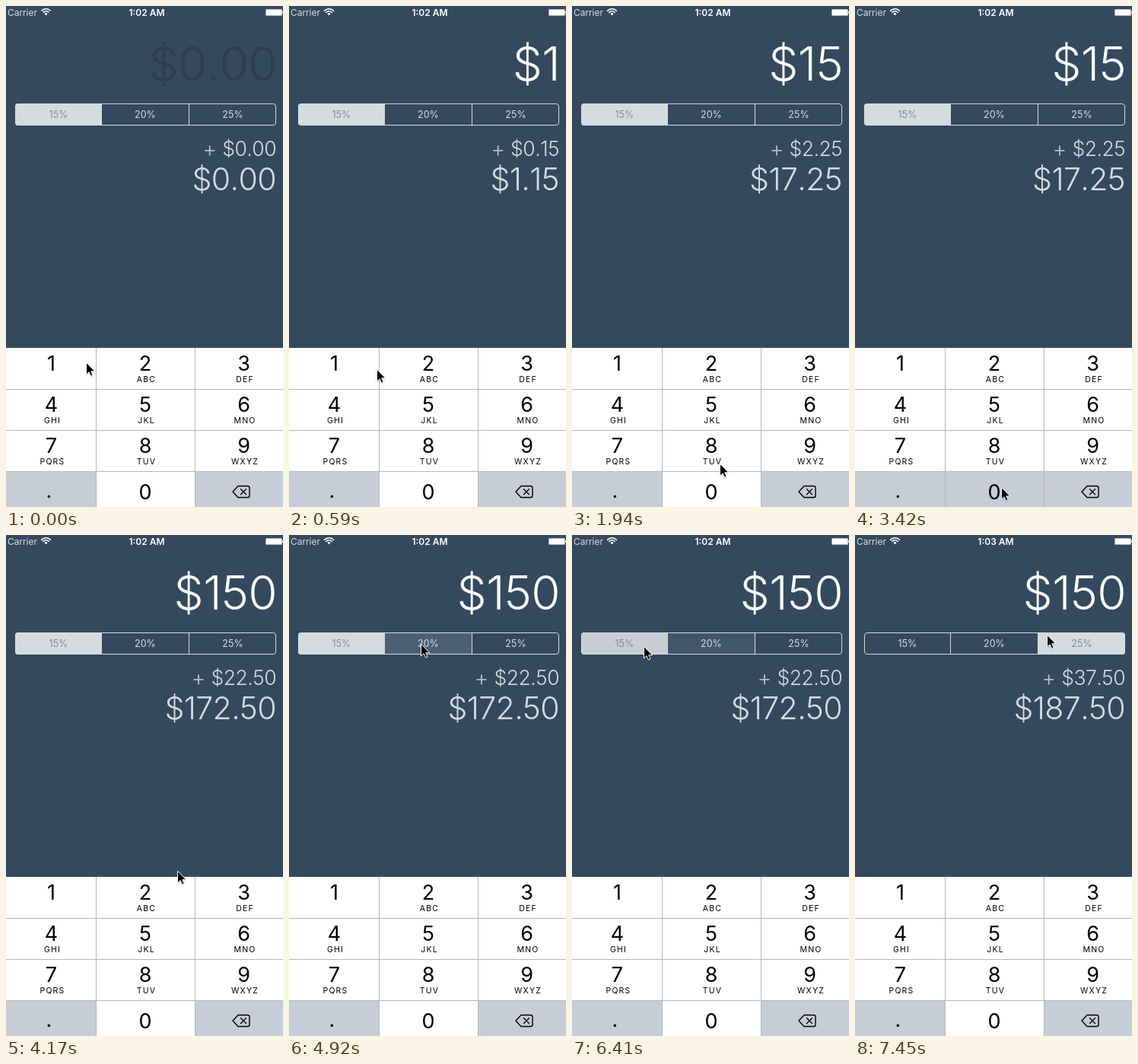
These frames come from a looping animation (364x658 px, 8 s). An HTML page with a canvas:

```html
<!DOCTYPE html>
<html lang="en">
<head>
<meta charset="utf-8">
<title>Tip calculator</title>
<style>
html, body { margin: 0; width: 364px; height: 658px; overflow: hidden; background: #34495e; }
canvas { display: block; width: 364px; height: 658px; }
</style>
</head>
<body>
<canvas id="stage"></canvas>
<script>
const W = 364, H = 658, LOOP = 8000, TICK = 149;
const BG = '#34495e', PALE = '#d6dbdf', GREY = '#c6cdd7', LINE = '#b4b6ba';
const canvas = document.getElementById('stage');
const ctx = canvas.getContext('2d');
const dpr = window.devicePixelRatio || 1;
canvas.width = W * dpr;
canvas.height = H * dpr;
ctx.scale(dpr, dpr);
ctx.fontKerning = 'none';

const typed = [[0, 0], [2, 1], [10, 15], [24, 150]];
const picked = [[0, 0], [34, 1], [43, 0], [49, 2]];
const keyTaps = [[1, '1'], [9, '5'], [23, '0']];
const segTaps = [[33, 1], [42, 0], [48, 2]];
const percents = [15, 20, 25];

const easeOut = u => 1 - Math.pow(1 - u, 2.15);
const easeBoth = u => u * u * (3 - 2 * u);
const moves = [
  { at: 4, n: 4, ease: easeBoth, to: [167, 528], via: [136, 498] },
  { at: 11, n: 7, ease: easeOut, to: [192, 632], via: [202, 580] },
  { at: 26, n: 7, ease: easeBoth, to: [173, 143], via: [268, 390] },
  { at: 39, n: 3, ease: easeBoth, to: [94, 146], via: [134, 146] },
  { at: 45, n: 2, ease: easeBoth, to: [252, 131], via: [173, 138] }
];

const latest = (list, k) => list.filter(e => e[0] <= k).pop()[1];
const money = v => '$' + v.toFixed(2);

function pointer(k) {
  let p = [105, 468];
  for (const m of moves) {
    if (k < m.at) break;
    const s = m.ease(Math.min(1, (k - m.at + 1) / m.n));
    p = p.map((a, i) => (1 - s) * (1 - s) * a + 2 * s * (1 - s) * m.via[i] + s * s * m.to[i]);
  }
  return p.map(Math.round);
}

function text(s, x, y, size, weight, color, align = 'center', spacing = 0) {
  ctx.font = `${weight} ${size}px Inter, Roboto, sans-serif`;
  ctx.letterSpacing = spacing + 'px';
  ctx.textAlign = align;
  ctx.fillStyle = color;
  ctx.fillText(s, x, y);
  return ctx.measureText(s).width;
}

function rect(x, y, w, h, color) {
  ctx.fillStyle = color;
  ctx.fillRect(x, y, w, h);
}

function statusBar(k) {
  text('Carrier', 2, 13, 12, 400, PALE, 'left');
  ctx.strokeStyle = ctx.fillStyle = '#fff';
  ctx.lineWidth = 1.5;
  for (const r of [8.2, 5.2]) {
    ctx.beginPath();
    ctx.arc(52.5, 12, r, -Math.PI * 0.76, -Math.PI * 0.24);
    ctx.stroke();
  }
  ctx.beginPath();
  ctx.moveTo(52.5, 12.6);
  ctx.arc(52.5, 12, 2.8, -Math.PI * 0.76, -Math.PI * 0.24);
  ctx.fill();
  text(k < 45 ? '1:02 AM' : '1:03 AM', 185, 13, 12, 600, '#fff');
  ctx.fillStyle = 'rgba(255,255,255,0.6)';
  ctx.beginPath();
  ctx.roundRect(341, 4, 22, 9, 1.5);
  ctx.fill();
  rect(342, 5, 20, 7, '#fff');
  rect(363, 7, 1, 3, PALE);
}

function amounts(k) {
  const bill = latest(typed, k);
  const tip = bill * percents[latest(picked, k)] / 100;
  text(bill ? '$' + bill : '$0.00', 356, 98, 62, 300, bill ? '#fff' : '#2c3e50', 'right', -0.6);
  const w = text(money(tip), 355, 197, 26.5, 300, PALE, 'right', -0.5);
  text('+', 355 - w - 7, 197.5, 29, 300, '#b5bec6', 'right');
  text(money(bill + tip), 355, 242, 41, 300, PALE, 'right', -0.6);
}

function segments(k) {
  const edges = [12, 126, 240, 355];
  const chosen = latest(picked, k);
  const tap = segTaps.find(([at]) => k === at || k === at + 1);
  const fading = tap && tap[1] === chosen ? latest(picked, k - 1) : -1;
  ctx.save();
  ctx.beginPath();
  ctx.roundRect(12, 128, 343, 29, 4);
  ctx.clip();
  percents.forEach((p, i) => {
    const x = edges[i], w = edges[i + 1] - x;
    const held = tap && tap[1] === i;
    if (i === chosen) rect(x, 128, w, 29, held ? '#c8ced3' : PALE);
    else if (held) rect(x, 128, w, 29, '#4c6073');
    else if (i === fading) rect(x, 128, w, 29, '#425669');
  });
  ctx.restore();
  rect(125, 129, 1, 27, PALE);
  rect(240, 129, 1, 27, PALE);
  ctx.strokeStyle = PALE;
  ctx.lineWidth = 1;
  ctx.beginPath();
  ctx.roundRect(12.5, 128.5, 342, 28, 3.5);
  ctx.stroke();
  percents.forEach((p, i) =>
    text(p + '%', [69, 183, 298][i], 147, 12.5, 400, i === chosen ? '#7f8e9c' : PALE));
}

function deleteIcon() {
  ctx.strokeStyle = '#000';
  ctx.lineWidth = 1.4;
  ctx.lineJoin = ctx.lineCap = 'round';
  ctx.beginPath();
  ctx.moveTo(298, 638);
  ctx.lineTo(305, 630.5);
  ctx.arcTo(320, 630.5, 320, 638, 2.5);
  ctx.arcTo(320, 645.5, 305, 645.5, 2.5);
  ctx.lineTo(305, 645.5);
  ctx.closePath();
  ctx.moveTo(308.5, 634.5);
  ctx.lineTo(315.5, 641.5);
  ctx.moveTo(315.5, 634.5);
  ctx.lineTo(308.5, 641.5);
  ctx.stroke();
}

function keyboard(k) {
  const cols = [0, 118, 248, 364], mids = [59.5, 183, 312.5];
  const labels = ['', 'ABC', 'DEF', 'GHI', 'JKL', 'MNO', 'PQRS', 'TUV', 'WXYZ'];
  const tap = keyTaps.find(([at]) => at === k);
  [...'123456789.0<'].forEach((key, i) => {
    const c = i % 3, y = 449 + 54 * Math.floor(i / 3);
    const dark = key === '.' || key === '<' || (tap && tap[1] === key);
    rect(cols[c], y, cols[c + 1] - cols[c], 54, dark ? GREY : '#fff');
    if (key === '<') deleteIcon();
    else if (key === '.') text('.', 56.5, 646, 27, 400, '#000');
    else text(key, mids[c], key === '0' ? 648 : y + 30, 27, 400, '#000');
    if (labels[i]) text(labels[i], mids[c] + 1.5, y + 45, 10.5, 400, '#000', 'center', 1.2);
  });
  for (const x of [118, 248]) rect(x, 449, 1, 209, LINE);
  for (const y of [503, 557, 611]) rect(0, y, W, 1, LINE);
}

function arrow([x, y]) {
  const pts = [[0, 0], [0, 15.5], [3.6, 12.2], [6, 17.6], [8.6, 16.5], [6.3, 11.2], [11, 11.2]];
  ctx.save();
  ctx.translate(x + 0.5, y + 0.5);
  ctx.beginPath();
  pts.forEach(p => ctx.lineTo(...p));
  ctx.closePath();
  ctx.shadowColor = 'rgba(0,0,0,0.35)';
  ctx.shadowBlur = 2 * dpr;
  ctx.shadowOffsetY = dpr;
  ctx.fillStyle = '#000';
  ctx.fill();
  ctx.shadowColor = 'transparent';
  ctx.strokeStyle = '#fff';
  ctx.lineWidth = 1;
  ctx.lineJoin = 'miter';
  ctx.stroke();
  ctx.restore();
}

function draw(now) {
  const k = Math.floor((now % LOOP + 8) / TICK);
  rect(0, 0, W, H, BG);
  statusBar(k);
  amounts(k);
  segments(k);
  keyboard(k);
  arrow(pointer(k));
  requestAnimationFrame(draw);
}
requestAnimationFrame(draw);
</script>
</body>
</html>
```
